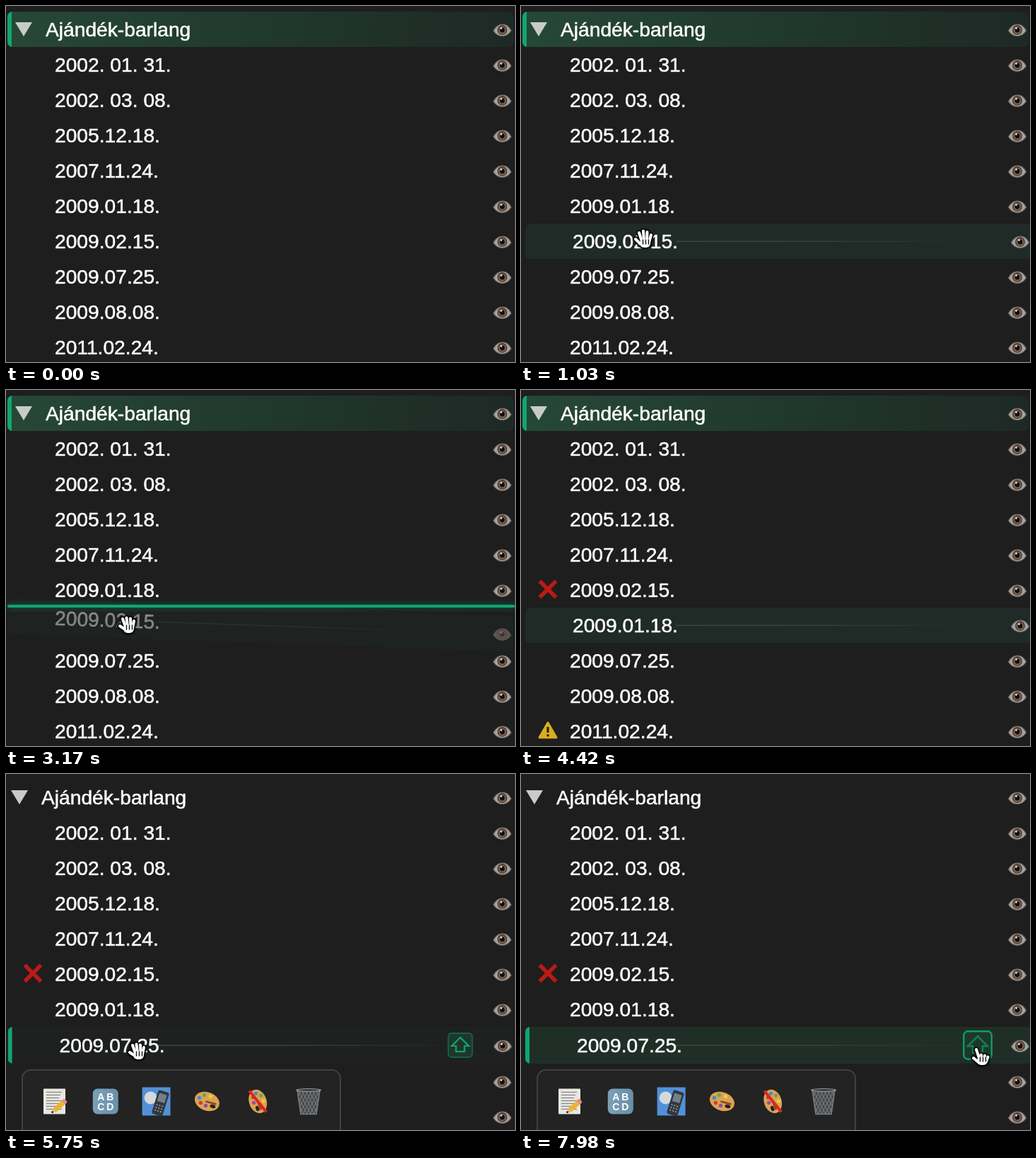
Recreate the animation shown at these times as an HTML page with a canvas. Size 720 px wide and 504 px high, loop 8 s.

```html
<!DOCTYPE html>
<html lang="hu">
<head>
<meta charset="utf-8">
<style>
  html, body { margin: 0; width: 100%; height: 100%; overflow: hidden; background: #1e1e1e; }
  canvas { display: block; width: 720px; height: 504px; }
</style>
</head>
<body>
<canvas id="stage" width="720" height="504"></canvas>
<script>
const ctx = document.getElementById('stage').getContext('2d');
const LOOP = 8000, DRAG = 2750, DROP = 3700, SELECT = 5700, BUTTON = 6900;
const GREEN = '#10a66f', FONT = '"Liberation Sans", Arial, sans-serif';

const names = ['Ajándék-barlang', '2002. 01. 31.', '2002. 03. 08.', '2005.12.18.', '2007.11.24.',
  '2009.01.18.', '2009.02.15.', '2009.07.25.', '2009.08.08.', '2011.02.24.'];

// Hovered row, from, to
const hovers = [[7, 330, 500], [6, 500, DRAG], [6, DROP, 4900], [7, 4900, SELECT], [7, SELECT, 9000]];

// Time, x, y
const cursorPath = [[330, 194, 400], [820, 173, 330], [1500, 173, 330], [2200, 170, 337], [2700, 170, 337],
  [3050, 171, 332], [3200, 171, 332], [3600, 173, 291], [4700, 175, 320], [5350, 185, 392],
  [6090, 185, 392], [6960, 650, 400], [8000, 650, 400]];

const clamp = v => Math.max(0, Math.min(1, v));
const ease = v => { v = clamp(v); return v * v * (3 - 2 * v); };
const fade = (t, start, ms = 200) => 1 - (1 - clamp((t - start) / ms)) ** 2;

function hoverAmount(row, t) {
  let amount = 0;
  for (const [r, from, to] of hovers) {
    if (r !== row || t < from) continue;
    const instantEnd = to === SELECT || to === DRAG;
    const out = t < to ? 1 : instantEnd ? 0 : 1 - fade(t, to);
    amount = Math.max(amount, ease((t - from) / 210) * out);
  }
  return amount;
}

function cursorAt(t) {
  let i = 0;
  while (i < cursorPath.length - 2 && t >= cursorPath[i + 1][0]) i++;
  const [t0, x0, y0] = cursorPath[i], [t1, x1, y1] = cursorPath[i + 1];
  const k = ease((t - t0) / (t1 - t0));
  return [x0 + (x1 - x0) * k, y0 + (y1 - y0) * k];
}

function at(x, y, draw, { scale = 1, turn = 0, alpha = 1 } = {}) {
  ctx.save();
  ctx.translate(x, y);
  ctx.rotate(turn);
  ctx.scale(scale, scale);
  ctx.globalAlpha *= alpha;
  draw();
  ctx.restore();
}

function paint(fill, stroke, width) {
  if (fill) { ctx.fillStyle = fill; ctx.fill(); }
  if (stroke) { ctx.strokeStyle = stroke; ctx.lineWidth = width; ctx.stroke(); }
}

function box(x, y, w, h, radius, fill, stroke, width = 2) {
  ctx.beginPath();
  ctx.roundRect(x, y, w, h, radius);
  paint(fill, stroke, width);
}

function poly(points, fill, stroke, width = 2) {
  ctx.beginPath();
  points.forEach(([x, y]) => ctx.lineTo(x, y));
  ctx.closePath();
  paint(fill, stroke, width);
}

function disc(x, y, rx, fill, ry = rx, turn = 0) {
  ctx.beginPath();
  ctx.ellipse(x, y, rx, ry, turn, 0, 7);
  paint(fill);
}

function line(x1, y1, x2, y2, color, width) {
  ctx.beginPath();
  ctx.moveTo(x1, y1);
  ctx.lineTo(x2, y2);
  paint(null, color, width);
}

// A thin outline thickens the strokes to a medium weight.
function text(label, x, y, size, { weight = '', align = 'left', outline = 0.55 } = {}) {
  ctx.font = `${weight} ${size}px ${FONT}`;
  ctx.textAlign = align;
  ctx.lineJoin = 'round';
  ctx.fillStyle = ctx.strokeStyle = '#fff';
  ctx.lineWidth = outline;
  ctx.fillText(label, x, y);
  if (outline) ctx.strokeText(label, x, y);
}

function gradient(x1, x2, ...colors) {
  const g = ctx.createLinearGradient(x1, 0, x2, 0);
  colors.forEach((c, i) => g.addColorStop(i / (colors.length - 1), c));
  return g;
}

function eye() {
  ctx.beginPath();
  ctx.moveTo(-12.5, 1);
  ctx.bezierCurveTo(-6, -11, 7, -11, 12.5, 1);
  ctx.bezierCurveTo(6, 11, -6, 11, -12.5, 1);
  paint('#a8a39e', '#6e6965', 1.2);
  disc(0, 0, 7, '#4a3c34');
  disc(0, 0.3, 5.6, '#7a604e');
  disc(0, 0, 3.4, '#100e0e');
  disc(-1.5, -2.5, 1.4, '#dedad6');
}

function cross() {
  line(-11.5, -11.5, 11.5, 11.5, '#bc1a16', 5.5);
  line(-11.5, 11.5, 11.5, -11.5, '#bc1a16', 5.5);
}

function warning() {
  ctx.lineJoin = 'round';
  poly([[0, -11], [12, 10], [-12, 10]], '#d9ad22', '#d9ad22', 3);
  line(0, -5, 0, 3, '#241d08', 3);
  disc(0, 7, 1.8, '#241d08');
}

function upButton(active) {
  box(-17, -17, 34, 34, 5, '#1d372c', `rgba(16,166,111,${0.42 + 0.5 * active})`);
  ctx.lineJoin = 'miter';
  poly([[0, -11], [12, 1], [6, 1], [6, 9], [-6, 9], [-6, 1], [-12, 1]], null,
    `rgba(16,166,111,${1 - 0.35 * active})`, 2.2);
}

function drawRow(row, t) {
  const selected = row === (t < SELECT ? 0 : 7);
  const dragged = row === 6 && t >= DRAG && t < DROP;
  const hover = dragged ? 0.8 : hoverAmount(row, t);
  const tall = row === 7 && selected ? 2 : 0;
  const push = t >= SELECT && row > 7 ? 2 : 0;
  const k = dragged ? ease((t - DRAG) / 200) : 0;
  const shift = dragged ? 4 * (1 - k) : 4 * hover;
  const swapped = t >= DROP && (row === 5 || row === 6);
  const label = names[swapped ? 11 - row : row];

  at(361 + shift, 34 + 50 * row + push + tall / 2, () => {
    ctx.translate(-361, 0);
    const top = -26 - tall / 2, height = 50 + tall;
    if (selected && row === 0) box(2, top, 716, height, 7, gradient(2, 718, '#264837', '#20392d', '#1e2925'));
    if (hover) box(2, top, 716, height, 7, `rgba(${tall ? '31,47,40' : '32,43,39'},${hover})`);
    if (selected) {
      ctx.save();
      ctx.beginPath();
      ctx.roundRect(2, top, 716, height, 7);
      ctx.clip();
      ctx.fillStyle = GREEN;
      ctx.fillRect(2, top, 6, height);
      ctx.restore();
    }
    if (hover || (selected && row)) {
      ctx.fillStyle = gradient(215, 640, '#3a4943', '#34403b', 'rgba(50,60,55,0)');
      ctx.fillRect(215, -1.5, 425, 1.5);
    }
    const indent = selected ? 6 : 0;
    if (row === 0) {
      poly([[7 + indent, -11], [31 + indent, -11], [19 + indent, 9]], '#c9cbca');
      text(label, 50 + indent, 9, 28.2);
    } else {
      text(label, 69 + indent, 9, 28.2);
    }
    if (t >= DROP && row === 5) at(38, -2, cross);
    if (t >= DROP && row === 9) at(38, -2, warning);
    if (selected && row) {
      const active = fade(t, BUTTON);
      at(642, -1, () => upButton(active), { scale: 1 + 0.16 * active });
    }
    at(702, 0, eye);
  }, { turn: k * 2 * Math.PI / 180, alpha: 1 - 0.58 * k });
}

function drawDropLine(t) {
  if (t < DRAG + 60 || t >= DROP) return;
  ctx.save();
  ctx.shadowColor = 'rgba(16,166,111,.6)';
  ctx.shadowBlur = 8;
  box(2, t < 3430 ? 304 : 254, 718, 4, 2, GREEN);
  ctx.restore();
}

function notepad() {
  box(-16, -18, 31, 36, 1, '#e9e7e1');
  for (let y = -13; y < 15; y += 4) line(-12, y, 10 - (y + 13) % 3 * 2, y, '#85837f', 1.2);
  at(6, 7, () => {
    box(-8, -3.5, 18, 7, 1, '#eeb32f');
    box(8, -3.5, 5, 7, 2, '#dc8a8f');
    poly([[-8, -3.5], [-14, 0], [-8, 3.5]], '#d9b98a');
    disc(-12.5, 0, 1.5, '#3c3026');
  }, { turn: -0.72 });
}

function letters() {
  box(-18, -18, 36, 36, 7, gradient(-18, 18, '#7ba0b7', '#6a90a9'));
  const style = { weight: 'bold', align: 'center', outline: 0 };
  for (const [letter, x, y] of [['A', -6.5, -2], ['B', 6.5, -2], ['C', -6.5, 12], ['D', 6.5, 12]]) {
    text(letter, x, y, 14, style);
  }
}

function phoneTile() {
  box(-20, -20, 40, 40, 0, '#5291d8');
  disc(-8, -5, 9, '#d3d9dc');
  at(6, 2, () => {
    box(-8, -17, 16, 35, 3, '#33373c');
    box(-5.5, -13, 11, 12, 1, '#73808c');
    for (let i = 0; i < 9; i++) box(-5 + i % 3 * 4, 3 + Math.floor(i / 3) * 4, 2, 2, 0, '#8b9199');
  }, { turn: 0.3 });
}

function palette() {
  disc(0, 0, 18, '#dda253', 13, 0.35);
  disc(8, 7, 4, '#232323', 2.6, 0.3);
  [[-11, -5, '#3f8ed0'], [-4, -9, '#5bae4b'], [5, -7, '#e9d142'], [-9, 2, '#c84332'], [-2, 6, '#8c50a0']]
    .forEach(([x, y, c]) => disc(x, y, 2.7, c));
  line(-2, 0, 13, 4, '#7b4a2a', 2.4);
}

function noPalette() {
  at(0, 0, palette, { scale: 0.95, turn: 0.9 });
  line(-12, -15, 12, 15, '#e02420', 4);
}

function bin() {
  poly([[-16, -16], [16, -16], [11, 18], [-11, 18]], '#45484a', '#7d8082', 1.5);
  ctx.save();
  ctx.clip();
  for (let x = -50; x < 50; x += 5) {
    line(x, -16, x + 18, 18, '#7d8082', 1);
    line(x, -16, x - 18, 18, '#7d8082', 1);
  }
  ctx.restore();
  disc(0, -16, 18, '#97999b', 2.6);
  disc(0, -16, 15, '#383b3d', 1.4);
}

function drawMenu() {
  box(23, 419, 450, 110, 12, '#232323', '#404040');
  [notepad, letters, phoneTile, palette, noPalette, bin].forEach((icon, i) => at(69 + i * 71.8, 463.5, icon));
}

// Fingers and palm as thick strokes: x1, y1, x2, y2, width
const palm = [1, 6, 4, 6, 12];
const hands = {
  open: [palm, [-6, -9, -2, 3, 4], [0, -11.5, 1, 3, 4], [5.5, -10, 5, 3, 4], [11, -6, 8, 5, 4], [-11, 0, -4, 7, 4]],
  closed: [palm, [-6, -8, -2, 3, 4], [-0.5, -9.5, 1, 3, 4], [5, -8.5, 5.5, 3, 4], [10, -5, 8, 5, 4], [-10, 2, -4, 6, 4]],
  point: [palm, [-6, -10, -1, 5, 4], [1, -2.5, 2, 5, 4], [6, -1.5, 6, 5, 4], [10.5, 0.5, 8, 7, 4], [-10, 2, -3, 8, 4]]
};

function hand(kind) {
  ctx.lineCap = 'round';
  ctx.save();
  ctx.shadowColor = 'rgba(0,0,0,.5)';
  ctx.shadowBlur = 3;
  ctx.shadowOffsetY = 1;
  hands[kind].forEach(([a, b, c, d, w]) => line(a, b, c, d, '#080808', w + 3.5));
  ctx.restore();
  hands[kind].forEach(([a, b, c, d, w]) => line(a, b, c, d, '#fff', w));
  for (const x of [-0.5, 3.5, 7.5]) line(x, 1, x, 7, '#111', 1.4);
}

function drawCursor(t) {
  if (t < 330 || (t >= DROP && t < 4700)) return;
  const [x, y] = cursorAt(t);
  const gripping = (t > 1850 && t < DROP) || (t > 5450 && t < 6090);
  at(x, y, () => hand(x > 628 ? 'point' : gripping ? 'closed' : 'open'));
}

function frame(now) {
  const t = now % LOOP;
  ctx.fillStyle = '#1e1e1e';
  ctx.fillRect(0, 0, 720, 504);
  names.forEach((_, row) => drawRow(row, t));
  drawDropLine(t);
  if (t >= SELECT) drawMenu();
  drawCursor(t);
  requestAnimationFrame(frame);
}
requestAnimationFrame(frame);
</script>
</body>
</html>
```
